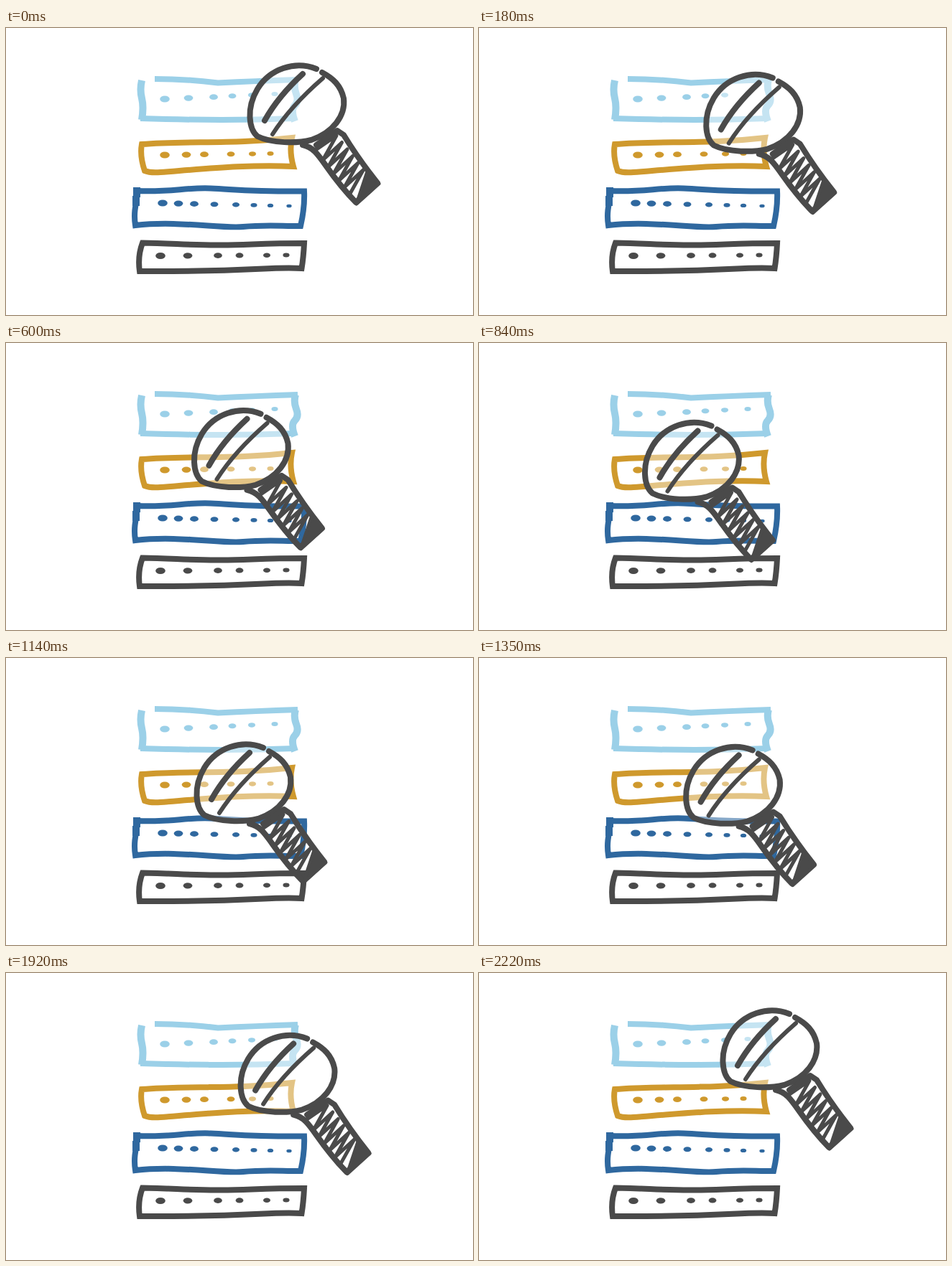
An HTML page that plays this animation: 650x400 px, repeating every 2620 ms.

```html
<!DOCTYPE html>
<html lang="en">
<head>
<meta charset="utf-8">
<title>Searching the stack</title>
<style>
  html, body { margin: 0; width: 100%; height: 100%; overflow: hidden; background: #fff; }
  svg { display: block; width: 650px; height: 400px; }
  path { fill: none; stroke-width: 8; }
  #glass { stroke: #4a4a4a; stroke-linejoin: round; stroke-linecap: round; }
</style>
</head>
<body>
<svg viewBox="0 0 650 400">
  <g id="rows"></g>
  <g id="glass">
    <path id="lens" style="fill: #fff; fill-opacity: .42" d="M432 57C402 45 367 57 350 85C334 112 338 141 350 151C370 161 405 161 425 156C455 146 473 122 470 98C466 80 455 70 440 62"/>
    <path d="M413 64Q379 95 360 129"/>
    <path style="stroke-width: 6" d="M441 70Q396 109 371 148"/>
    <path d="M413 163C438 168 440 195 487 243L517 216Q490 182 470 149L461 143 432 163"/>
    <path id="hatch" style="stroke-width: 5"/>
    <path style="fill: #4a4a4a; stroke-width: 5" d="M503 200L519 217 488 245Z"/>
  </g>
</svg>
<script>
const STEP = 30, TRAVEL = 2220, LOOP = 2620;
const LEFT = [-108.5, 58.5], BEND = [-63.8, 73.6], LOW = [-27, 72.5];
const LEFT_AT = 840, LOW_AT = 1590;
const TEETH = 6;
const glass = document.getElementById('glass');

// Each row: a loose outline, wider side strokes, and dots from one height to another.
const rows = [
  { ink: '#9bd0e8', from: 99, to: 92, dots: [221, 254, 289, 315, 342, 374],
    outline: 'M207 71Q250 71 295 76.500Q345 74 406 72M402 126Q350 128 300 128T187 126',
    sides: 'M403 72Q400 82 404 92T402 108T402 130M189 73Q186 86 189 98T189 128' },
  { ink: '#cf992d', from: 177, to: 175, dots: [221, 251, 276, 313, 343, 368],
    outline: 'M189 162C250 157 320 162 398 153Q394 172 400 193C340 190 280 196 215 201Q200 202 193 199Q186 178 189 162Z' },
  { ink: '#2f689f', from: 244, to: 248, dots: [218, 240, 262, 290, 320, 345, 368, 394],
    outline: 'M183 227C230 229 250 222 285 223.500S340 228 415 227.500Q416 250 410 276C380 276 360 274 330 277S240 268 180 275Q178 262 180 250T183 227Z',
    sides: 'M182 222V236M181 234V248' },
  { ink: '#4a4a4a', from: 317.5, to: 316.5, dots: [215, 253, 295, 325, 363, 390],
    outline: 'M190 299.500C230 300 260 303 300 302.500S360 300 415 300Q414 320 411.500 335C370 332 340 340 186 339Q183 318 190 299.500Z' }
];

function drawRow({ ink, from, to, dots, outline, sides = '' }) {
  const marks = dots.map((x, i) => {
    const y = from + (to - from) * i / (dots.length - 1), size = 6.8 - 0.45 * i;
    return `<ellipse cx="${x}" cy="${y}" rx="${size}" ry="${size * 0.65}"/>`;
  });
  return `<g fill="${ink}" stroke="${ink}"><path d="${outline}"/>
    <path d="${sides}" style="stroke-width: 10"/><g stroke="none">${marks.join('')}</g></g>`;
}
document.getElementById('rows').innerHTML = rows.map(drawRow).join('');

// Zigzag shading down the handle.
const zigzag = Array.from({ length: TEETH }, (_, i) =>
  `${460 + 7.5 * i} ${150 + 9.5 * i} ${441 + 7.5 * i} ${184 + 9.5 * i}`);
document.getElementById('hatch').setAttribute('d', 'M440 158L431 170 ' + zigzag.join(' '));

// Straight down-left, a shallow arc to the right, then straight home.
function offset(t) {
  if (t < LEFT_AT) return LEFT.map(v => v * t / LEFT_AT);
  if (t < LOW_AT) {
    const s = (t - LEFT_AT) / (LOW_AT - LEFT_AT), r = 1 - s;
    return LEFT.map((v, i) => r * r * v + 2 * r * s * BEND[i] + s * s * LOW[i]);
  }
  return LOW.map(v => v * (TRAVEL - t) / (TRAVEL - LOW_AT));
}

function draw() {
  const t = performance.now() % LOOP;
  const [x, y] = offset(Math.min(TRAVEL, Math.floor(t / STEP) * STEP));
  glass.setAttribute('transform', `translate(${x} ${y})`);
  requestAnimationFrame(draw);
}
draw();
</script>
</body>
</html>
```
